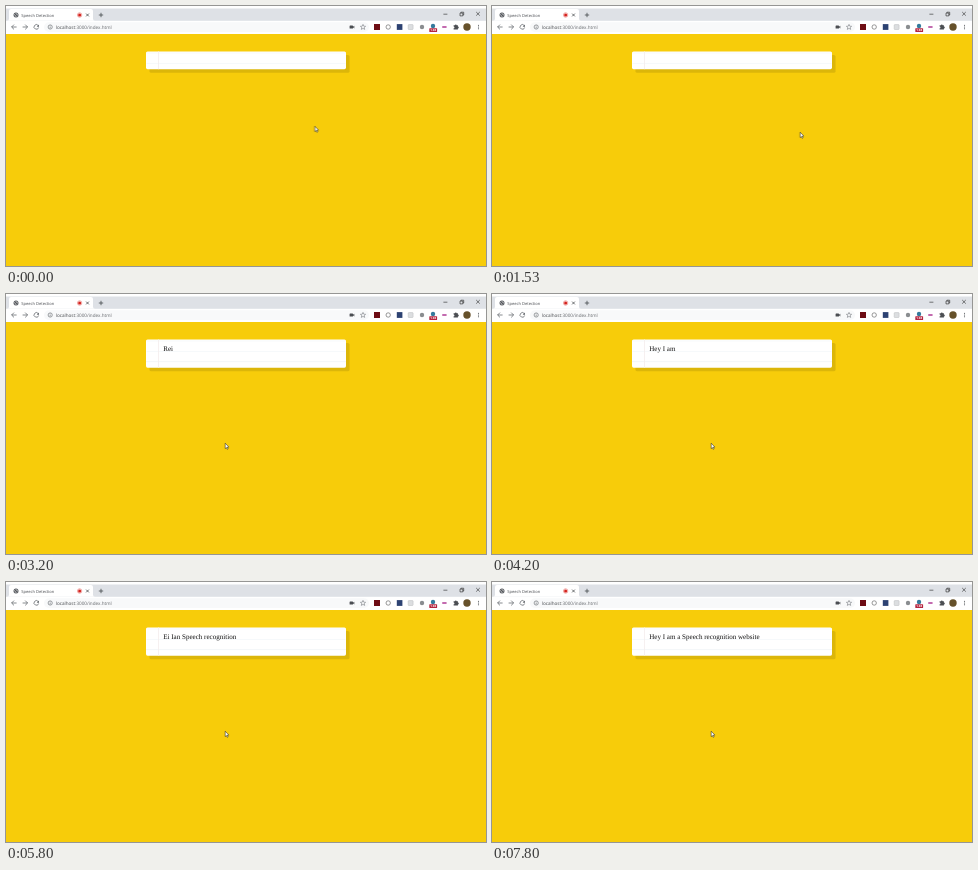
Write an HTML page that moves like this. It is 480 px wide and 260 px high and loops after 8 s.

```html
<!DOCTYPE html>
<html lang="en">
<head>
<meta charset="utf-8">
<title>Speech Detection</title>
<style>
  html, body { margin: 0; width: 100%; height: 100%; overflow: hidden; background: #f7cc0a; }
  svg { display: block; width: 480px; height: 260px; }
  text { text-rendering: geometricPrecision; white-space: pre; }
  .ui { font-family: "Open Sans", "Noto Sans", sans-serif; }
  .line { fill: none; stroke: #5f6368; stroke-width: .75; }
  .speech { font: 7.05px "Liberation Serif", "Times New Roman", serif; fill: #111; }

  .card, .words, .rule, .cursor { animation: 8s step-end infinite; }
  .card { height: 17.8px; animation-name: grow; }
  .rule { visibility: hidden; animation-name: show; }
  .words { animation-name: words; }
  .cursor { animation-name: move; }

  @keyframes grow { 0% { height: 17.8px } 40%, 100% { height: 28.3px } }
  @keyframes show { 0% { visibility: hidden } 40%, 100% { visibility: visible } }

  /* the phrases are stacked 12px apart and seen through a one-line window */
  @keyframes words {
    0%      { transform: translateY(12px) }
    40%     { transform: translateY(0) }
    51.625% { transform: translateY(-12px) }
    57.5%   { transform: translateY(-24px) }
    60%     { transform: translateY(-36px) }
    64.125% { transform: translateY(-48px) }
    71.625% { transform: translateY(-60px) }
    85%     { transform: translateY(-72px) }
    97.5%, 100% { transform: translateY(-84px) }
  }
  @keyframes move {
    0%      { transform: translate(308.6px, 120px) }
    2.5%    { transform: translate(308.2px, 122.5px) }
    3.375%  { transform: translate(307.4px, 125.6px) }
    4.125%  { transform: translate(307.6px, 126.6px) }
    19.125% { transform: translate(307.9px, 126px) }
    20%     { transform: translate(220.6px, 149.2px) }
    23.375% { transform: translate(220.2px, 149.2px) }
    24.125% { transform: translate(219.8px, 149.1px) }
    25%     { transform: translate(219.4px, 149px) }
    25.875%, 100% { transform: translate(219px, 149px) }
  }
</style>
</head>
<body>
<svg viewBox="0 0 480 260" xmlns="http://www.w3.org/2000/svg">
  <defs>
    <clipPath id="window"><rect x="150" y="49" width="190" height="12"/></clipPath>
  </defs>

  <rect width="480" height="260" fill="#f7cc0a"/>

  <!-- tab strip -->
  <rect width="480" height="28" fill="#fff"/>
  <rect y="2.5" width="480" height="12.3" fill="#dee1e6"/>
  <path d="M1 14.8Q3 14.8 3 12.8V5Q3 3 5 3H85Q87 3 87 5V12.8Q87 14.8 89 14.8Z" fill="#fff"/>
  <circle cx="10" cy="9" r="2.5" fill="#55585d"/>
  <path d="M8.1 8.4L9.4 9.5 9.2 10.7M9.8 7.1L10.4 8.2 11.8 8.4M10.6 10.6L11.6 9.6" fill="none" stroke="#fff" stroke-width=".6"/>
  <text class="ui" x="15.3" y="10.5" font-size="4.05" fill="#45484d">Speech Detection</text>
  <circle cx="73.6" cy="9" r="2.2" fill="#fff" stroke="#e0504d" stroke-width=".5"/>
  <circle cx="73.6" cy="9" r="1.5" fill="#d5211c"/>
  <path class="line" d="M80.1 7.6L82.9 10.4M82.9 7.6L80.1 10.4M92.8 9H97.2M95 6.8V11.2" style="stroke:#3c4043"/>

  <!-- window buttons -->
  <g class="line" style="stroke:#222;stroke-width:.6">
    <path d="M437.4 8.2H441.4M470.2 6L473.8 9.6M473.8 6L470.2 9.6"/>
    <path d="M454 7.1H456.8V9.9H454ZM454.9 7V6.2H457.7V9H456.9"/>
  </g>

  <!-- toolbar -->
  <rect x="38" y="16.2" width="325" height="9.8" rx="4.9" fill="#f8f9fa"/>
  <path class="line" d="M10.6 21H5.6M8 18.6L5.6 21 8 23.4"/>
  <path class="line" d="M16.6 21H21.6M19.2 18.6L21.6 21 19.2 23.4"/>
  <path class="line" d="M32.1 19.4A2.3 2.3 0 1 0 32.6 21.5"/>
  <path d="M33 18.4V20.7H30.7Z" fill="#5f6368"/>
  <circle class="line" cx="44.2" cy="21" r="2.1" style="stroke-width:.6"/>
  <path class="line" d="M44.2 20.6V22.3M44.2 19.6V20.1" style="stroke-width:.6"/>
  <text class="ui" x="49.8" y="22.7" font-size="4.63" fill="#44474b">localhost<tspan fill="#63666b">:3000/index.html</tspan></text>

  <rect x="343.6" y="19.5" width="3.4" height="3.1" rx=".4" fill="#4b4e52"/>
  <path d="M346.6 21L348.3 19.7V22.4Z" fill="#4b4e52"/>
  <path class="line" d="M357 18.4L357.8 20.2 359.6 20.3 358.2 21.6 358.7 23.4 357 22.4 355.3 23.4 355.8 21.6 354.4 20.3 356.2 20.2Z" style="stroke-width:.5"/>

  <!-- extensions -->
  <rect x="368" y="18" width="6" height="6" fill="#6e0d14"/>
  <circle class="line" cx="382.2" cy="21" r="2.2" style="stroke:#777"/>
  <rect x="390.8" y="18.1" width="5.6" height="5.8" fill="#2d4272"/>
  <rect x="402.2" y="18.6" width="4.9" height="4.9" rx=".6" fill="#dcdee0" stroke="#b9bbbd" stroke-width=".5"/>
  <circle cx="416" cy="21" r="2.2" fill="#8a8d90"/>
  <circle cx="427" cy="20" r="2.2" fill="#347a9d"/>
  <rect x="423.3" y="22.2" width="7.8" height="3.8" rx=".6" fill="#b5253f"/>
  <text class="ui" x="427.2" y="25.2" font-size="2.9" font-weight="700" text-anchor="middle" fill="#fff">1.08</text>
  <rect x="436" y="20" width="4.8" height="2.1" rx="1" fill="#c36baf"/>
  <path d="M447.6 19.3H448.9A.9 .9 0 0 1 450.7 19.3H451.9V20.6A.9 .9 0 0 1 451.9 22.4V23.6H447.6V22.3A.8 .8 0 0 0 447.6 20.6Z" fill="#4b4e52"/>
  <circle cx="461" cy="21" r="3.7" fill="#66512a"/>
  <g fill="#4b4e52">
    <circle cx="472.5" cy="19.2" r=".55"/><circle cx="472.5" cy="21" r=".55"/><circle cx="472.5" cy="22.8" r=".55"/>
  </g>

  <!-- paper -->
  <rect class="card" x="143.5" y="49" width="200" rx="1.6" fill="#000" fill-opacity=".11"/>
  <rect class="card" x="140" y="45.4" width="200" rx="1.6" fill="#fff"/>
  <path d="M140.5 47H339.5M140.5 57.5H339.5" stroke="#f3f7fa" stroke-width=".7"/>
  <path class="rule" d="M140 67.6H340" stroke="#eef3f6" stroke-width=".7"/>
  <rect class="card" x="152" y="45.4" width=".8" fill="#f4eded"/>

  <g clip-path="url(#window)">
    <g class="words speech">
      <text x="157.2" y="57.1">Rei</text>
      <text x="157.2" y="69.1">Hey I am</text>
      <text x="157.2" y="81.1">Ei I am</text>
      <text x="157.2" y="93.1">Hey I am speaking</text>
      <text x="157.2" y="105.1">Hey I am Speech</text>
      <text x="157.2" y="117.1">Ei Ian Speech recognition</text>
      <text x="157.2" y="129.1">Ei Ian Speech recognition website</text>
      <text x="157.2" y="141.1">Hey I am a Speech recognition website</text>
    </g>
  </g>

  <path class="cursor" d="M.2 .2V5.6L1.4 4.5 2.2 6.3 3.1 5.9 2.3 4.1H3.9Z" fill="#fff" stroke="#2a2a2a" stroke-width=".55"/>
</svg>
</body>
</html>
```
